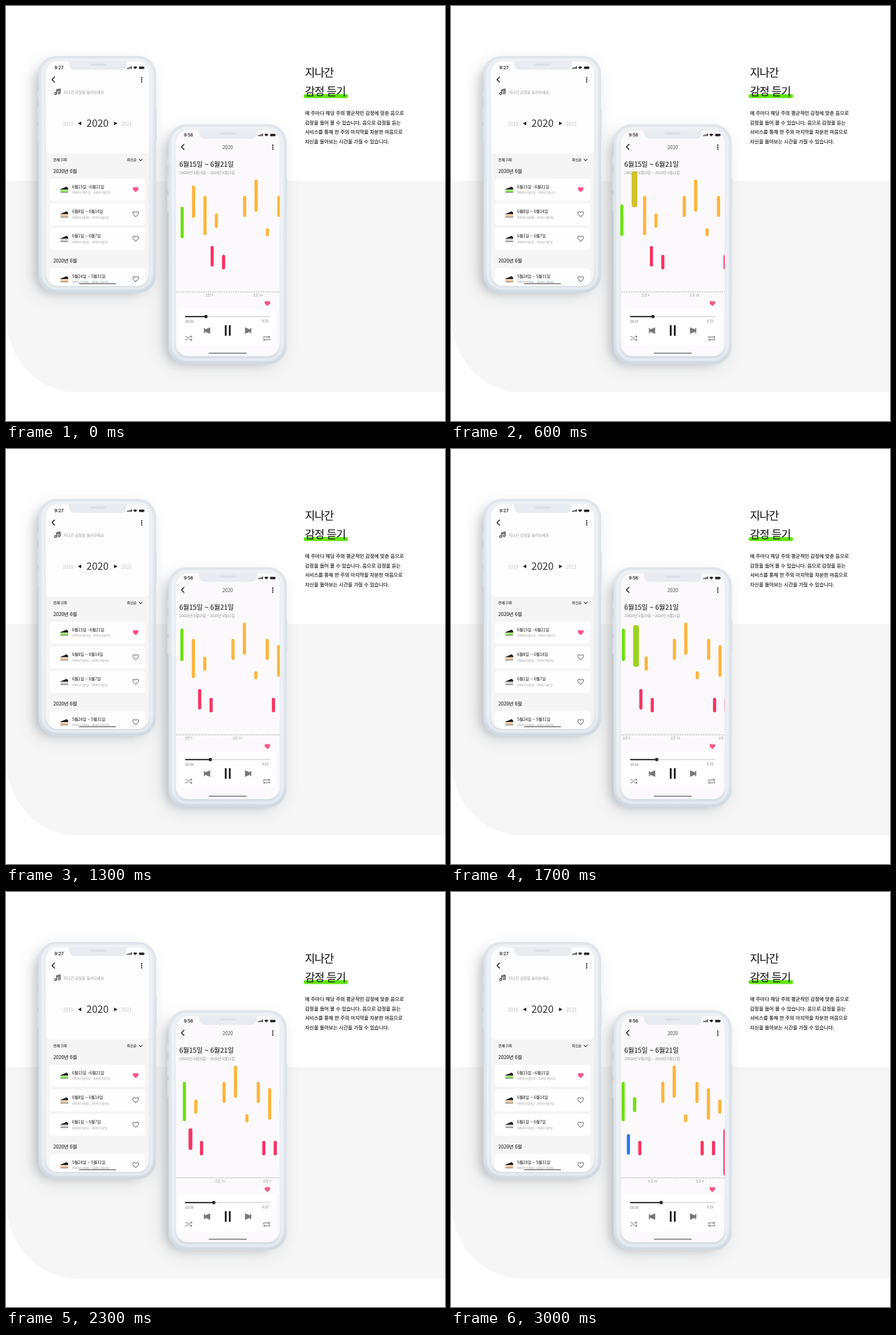
An HTML page that plays this animation: 770x728 px, repeating every 3100 ms.

```html
<!DOCTYPE html>
<html lang="ko">
<head>
<meta charset="utf-8">
<title>지나간 감정 듣기</title>
<style>
html, body { margin: 0; width: 100%; height: 100%; overflow: hidden; background: #fff; }
svg { display: block; width: 770px; height: 728px; font-family: "Noto Sans CJK KR", "Noto Sans CJK", "Noto Sans", sans-serif; }
text { white-space: pre; }
.clock { font: 600 7.4px Inter, sans-serif; }
.line { fill: none; stroke-linecap: round; stroke-linejoin: round; }
</style>
</head>
<body>
<svg viewBox="0 0 770 728">
  <defs>
    <linearGradient id="shell" x1="0" y1="0" x2="0" y2="1">
      <stop offset="0" stop-color="#e9edf1"/><stop offset=".9" stop-color="#e3e9ee"/><stop offset="1" stop-color="#d1d9e0"/>
    </linearGradient>
    <filter id="wide" x="-40%" y="-30%" width="180%" height="160%"><feGaussianBlur stdDeviation="15"/></filter>
    <filter id="near" x="-20%" y="-20%" width="140%" height="140%"><feGaussianBlur stdDeviation="7"/></filter>
    <filter id="rim" x="-10%" y="-10%" width="120%" height="120%"><feGaussianBlur stdDeviation="1.6"/></filter>
    <clipPath id="screenA"><rect x="70" y="97" width="181" height="394" rx="21"/></clipPath>
    <clipPath id="screenB"><rect x="298" y="218" width="182" height="396" rx="21"/></clipPath>
    <clipPath id="chart"><rect x="297" y="275" width="183" height="250"/></clipPath>
    <path id="heart" d="M0 4.6C-3.2 1.8-5 .4-5-1.7C-5-3.3-3.8-4.4-2.5-4.4C-1.4-4.4-.5-3.8 0-3C.5-3.8 1.4-4.4 2.5-4.4C3.8-4.4 5-3.3 5-1.7C5 .4 3.2 1.8 0 4.6Z"/>
    <g id="status">
      <path d="M213 110.2v-1.6M215.3 110.2v-2.4M217.6 110.2v-3.3M219.9 110.2v-4.4" stroke="#222" stroke-width="1.5"/>
      <path d="M223 107.4q3.6-2.9 7.2 0l-3.6 3.4z" fill="#222"/>
      <rect x="233.3" y="106.2" width="9" height="4.2" rx="1" fill="#222"/><path d="M243 107.5v1.6" stroke="#222" stroke-width=".8"/>
      <g fill="#222"><circle cx="238" cy="126" r="1.2"/><circle cx="238" cy="129.5" r="1.2"/><circle cx="238" cy="133" r="1.2"/></g>
    </g>
    <path id="back" class="line" d="M85.2 124.6l-4.5 4.5l4.5 4.5" stroke="#222" stroke-width="1.5"/>
    <path id="skip" d="M347.300 565.200h1.600v2.600l9-3.800v10.800l-9-3.800v2.600h-1.600z" fill="#777" stroke="#777" stroke-width=".5" stroke-linejoin="round"/>
  </defs>

  <rect width="770" height="728" fill="#fff"/>
  <path d="M1 307H770V678H125C57 678 1 620 1 545Z" fill="#f6f6f6"/>

  <g id="phoneA"></g>
  <g clip-path="url(#screenA)">
    <rect x="70" y="97" width="181" height="394" fill="#f5f5f5"/>
    <rect x="70" y="80" width="181" height="179" rx="8" fill="#fefdfe"/>
    <g id="cards"></g>
    <path d="M107 97Q110.500 97 110.500 100Q111 112 121 112H202Q211.500 112 211.500 100Q211.500 97 215 97Z" fill="#e8ecf0"/>
    <rect x="128" y="486" width="65" height="2.2" rx="1.1" fill="#929296"/>
  </g>
  <rect x="147" y="101" width="28" height="3.6" rx="1.8" fill="#dadfe4"/>
  <text class="clock" x="85" y="110.800" fill="#222">9:27</text>
  <use href="#status"/><use href="#back"/>
  <g class="line" stroke="#444" stroke-width="1.3"><path d="M88.800 153.500V146.800L95 145.300V151.800M88.800 149L95 147.500"/><circle cx="87" cy="153.800" r="1.800"/><circle cx="93.200" cy="152.400" r="1.800"/></g>
  <path d="M132 202.800v6.400l-6-3.200zM189.500 202.800v6.400l6-3.200z" fill="#222"/>
  <path class="line" d="M233.300 268.700l2.800 2.800l2.800-2.800" stroke="#333" stroke-width="1.1"/>
  <g id="labelsA"></g>

  <g id="phoneB"></g>
  <g clip-path="url(#screenB)">
    <rect x="298" y="218" width="182" height="396" fill="#fbf9fc"/>
    <path d="M335 218Q338.500 218 338.500 221Q339 233 349 233H430Q439.500 233 439.500 221Q439.500 218 443 218Z" fill="#e8ecf0"/>
  </g>
  <rect x="375" y="222" width="28" height="3.6" rx="1.8" fill="#dadfe4"/>
  <text class="clock" x="312" y="228.800" fill="#222">9:56</text>
  <use href="#status" x="230" y="118"/><use href="#back" x="227" y="118"/>
  <g id="labelsB"></g>
  <g clip-path="url(#chart)">
    <path id="axis" d="M298 501.500H480" stroke="#999" stroke-width=".9" stroke-dasharray="2.400 1.600"/>
    <g id="hours" font-size="5.35" fill="#888"></g>
    <g id="bars"></g>
  </g>
  <use href="#heart" x="458.500" y="521.800" fill="#f65a86"/>
  <rect x="303.500" y="531" width="170.500" height="64" rx="4" fill="#fff"/>
  <path class="line" d="M315 544.800H463" stroke="#dcdcdc" stroke-width="2"/>
  <path class="line" id="played" stroke="#2c2c2c" stroke-width="2.200"/>
  <circle id="knob" cy="544.800" r="3" fill="#2c2c2c"/>
  <text id="clock" x="314.500" y="555.500" font-size="5.8" fill="#777"></text>
  <text x="449" y="554.800" font-size="5.8" fill="#777">0:25</text>
  <use href="#skip"/><use href="#skip" transform="translate(777.300 0) scale(-1 1)"/>
  <path d="M383.800 560h3.200v18.500h-3.200zM390.900 560h3.200v18.500h-3.200z" fill="#222"/>
  <g class="line" stroke="#666" stroke-width="1">
    <path d="M315 580H317.500L322.500 585.500H326M315 585.500H317.500L319 583.900M321 581.700L322.500 580H326M324.400 578.300L326.200 580L324.400 581.700M324.400 583.800L326.200 585.500L324.400 587.200"/>
    <path d="M451.800 582.700V580.500H462.500M460.800 578.800L462.600 580.500L460.800 582.200M462.600 583.300V585.600H452M453.600 583.900L451.800 585.600L453.600 587.300"/>
  </g>
  <rect x="355.500" y="608" width="67" height="2.200" rx="1.100" fill="#929296"/>

  <rect x="522" y="154.500" width="78" height="7" rx="3.500" fill="#62e60c"/>
  <g id="copy"></g>
</svg>
<script>
const NS = 'http://www.w3.org/2000/svg';
const $ = id => document.getElementById(id);

function set(el, attrs) {
  for (const k in attrs) el.setAttribute(k, attrs[k]);
}

function add(parent, tag, attrs, text) {
  const el = document.createElementNS(NS, tag);
  set(el, attrs);
  if (text) el.textContent = text;
  parent.appendChild(el);
  return el;
}

// bold is the width of a thin outline that makes the text heavier
function write(parent, x, y, size, fill, text, bold = 0) {
  return add(parent, 'text', { x, y, 'font-size': size, fill, stroke: fill, 'stroke-width': bold }, text);
}

function phone(parent, x, y, w, h) {
  const box = (dx, dy, bw, bh, rx, more) =>
    add(parent, 'rect', { x: x + dx, y: y + dy, width: bw, height: bh, rx, ...more });
  box(-10, 10, w + 4, h - 4, 36, { fill: '#555c66', opacity: .17, filter: 'url(#wide)' });
  box(-8, 14, w - 8, h - 12, 32, { fill: '#555c66', opacity: .2, filter: 'url(#near)' });
  [[59, 13], [87, 29], [123, 29]].forEach(([dy, bh]) => box(-2, dy, 3, bh, 1, { fill: '#dbe1e7' }));
  box(w - 1, 93, 2.5, 55, 1, { fill: '#dfe4e9' });
  box(0, 0, w, h, 31, { fill: 'url(#shell)' });
  box(2.5, 2.5, w - 5, h - 5, 29, { fill: 'none', stroke: '#c9d3dc', 'stroke-width': 2.5, opacity: .5, filter: 'url(#rim)' });
  box(8, 6.5, w - 16, h - 14, 25, { fill: 'none', stroke: '#f4f6f8', 'stroke-width': 4, opacity: .7, filter: 'url(#rim)' });
  box(.4, .4, w - .8, h - .8, 30.6, { fill: 'none', stroke: '#d5dce2', 'stroke-width': .8 });
}

phone($('phoneA'), 57, 88, 206, 415);
phone($('phoneB'), 285, 208, 207, 420);

const cards = [
  [303, '6월15일 ~6월21일', '6월15일 ~ 2020년 6월21일', '#8dec62'],
  [346.3, '6월8일 ~ 6월14일', '6월8일 ~ 2020년 6월14일', '#f9c89c'],
  [389.3, '6월1일 ~ 6월7일', '6월1일 ~ 2020년 6월7일', '#d2d2d6'],
  [460, '5월24일 ~ 5월31일', '6월8일 ~ 2020년 6월14일', '#f9c89c']
];
cards.forEach(([y, title, span, tint], i) => {
  const g = add($('cards'), 'g', { transform: `translate(0 ${y})` });
  add(g, 'rect', { x: 77, y: 0, width: 167, height: 38.5, rx: 5, fill: '#fefefe' });
  add(g, 'path', { d: 'M95 18.600L106.500 13.800L109 16.500V19H95Z', fill: '#222' });
  add(g, 'rect', { x: 95.5, y: 19.6, width: 13.5, height: 3.8, fill: tint });
  add(g, 'rect', { x: 95.5, y: 23.5, width: 13.5, height: .9, fill: '#444' });
  write(g, 116, 16.5, 7.2, '#333', title, .1);
  write(g, 116, 26.4, 4.3, '#999', '20020년 ' + span);
  const look = i ? { fill: 'none', stroke: '#777', 'stroke-width': 1.1 } : { fill: '#f9568a' };
  add(g, 'use', { href: '#heart', x: 227.5, y: 19, ...look });
});

const a = $('labelsA'), b = $('labelsB'), copy = $('copy');
write(a, 101, 153.5, 6.64, '#999', '지나간 감정을 들어보세요.');
write(a, 99.5, 209.5, 8.6, '#c4c4c4', '2019');
write(a, 141, 212, 17.5, '#333', '2020');
write(a, 201.8, 209.5, 8.6, '#c4c4c4', '2021');
write(a, 83, 272, 6.2, '#333', '전체 (18)', .15);
write(a, 212, 272, 6.2, '#333', '최신순', .15);
write(a, 83, 293, 8.5, '#333', '2020년 6월', .2);
write(a, 83, 450, 8.5, '#333', '2020년 6월', .2);
write(b, 379.7, 250.8, 8.3, '#444', '2020');
write(b, 304, 282.3, 11.75, '#222', '6월15일 ~ 6월21일', .15);
write(b, 304, 294.8, 6.27, '#888', '20020년 6월15일 ~ 2020년 6월21일');

['지나간', '감정 듣기'].forEach((s, i) =>
  write(copy, 524.5, 123.7 + 33.2 * i, 19, '#222', s, .2).setAttribute('letter-spacing', -.8));
['매 주마다 해당 주의 평균적인 감정에 맞춘 음으로',
  '감정을 들어 볼 수 있습니다. 음으로 감정을 듣는',
  '서비스를 통해 한 주의 마지막을 차분한 마음으로',
  '자신을 돌아보는 시간을 가질 수 있습니다.'
].forEach((s, i) => write(copy, 524.5, 190.8 + 16.8 * i, 8.52, '#222', s, .2));

const hours = ['오전 6', '오후 12', '오후 6'].map(s => add($('hours'), 'text', { y: 509 }, s));

// Bars: start centre x, top, bottom, moment of the bounce
const ORANGE = [255, 180, 58], GREEN = [108, 226, 12], RED = [249, 50, 98], BLUE = [42, 122, 238];
const row = (from, to, speed, list) => list.map(([x, top, end, hit = 1e6]) =>
  ({ x, top, end, hit, from, to, speed, el: add($('bars'), 'rect', {}) }));
const bars = [
  ...row(ORANGE, GREEN, 15.7, [
    [309, 348.3, 403.3, -690], [329, 315, 372, 343], [349, 333, 402, 1300], [369, 364, 389, 2393],
    [418.6, 333, 370], [438.6, 304.5, 361], [458.6, 390, 404], [478.6, 333, 370],
    [498.6, 344, 399.5], [518.6, 364, 389]
  ]),
  ...row(RED, BLUE, 16.8, [
    [361.6, 421, 457, 2270], [381.6, 436.5, 462], [490.9, 436.5, 462], [510.9, 436.5, 462], [530.9, 416, 497]
  ])
];

// Piecewise linear curve through [time, value] points
function curve(points, u) {
  if (u <= points[0][0]) return points[0][1];
  for (let i = 1; i < points.length; i++) {
    const [t0, v0] = points[i - 1], [t1, v1] = points[i];
    if (u <= t1) return v0 + (v1 - v0) * (u - t0) / (t1 - t0);
  }
  return points[points.length - 1][1];
}
const LIFT = [[0, 0], [120, 22], [500, 22], [607, 3.5], [680, -4], [730, -3.7], [850, 0]];
const GROW = [[0, 0], [150, 10], [207, 10], [257, 6], [330, 4], [500, 4], [600, 1], [650, 0]];
const WIDE = [[0, 0], [120, 4.5], [450, 4.5], [600, .4], [650, 0]];
const TINT = [[150, 0], [510, 1]];

function draw(ms) {
  const t = ms / 1000;
  for (const s of bars) {
    const u = ms - s.hit;
    const grow = curve(GROW, u), width = 5.5 + curve(WIDE, u), mix = curve(TINT, u);
    set(s.el, {
      x: s.x - 2.75 - s.speed * t,
      y: s.top - curve(LIFT, u) - grow / 2,
      width, height: s.end - s.top + grow, rx: Math.min(width / 2, 4),
      fill: `rgb(${s.from.map((c, i) => Math.round(c + (s.to[i] - c) * mix))})`
    });
  }
  const slide = Math.max(0, 30.5 * (t - .11));
  hours.forEach((el, i) => el.setAttribute('x', 349.2 + 84 * i - slide));
  $('axis').setAttribute('stroke-dashoffset', slide);
  const x = 350.6 + 6 * t;
  $('knob').setAttribute('cx', x);
  $('played').setAttribute('d', `M315 544.8H${x}`);
  $('clock').textContent = '00:0' + Math.floor(6.8 + t);
}

const LOOP = 3100, STEP = 100;
let start;
function tick(now) {
  if (start === undefined) start = now;
  draw(Math.floor((now - start) % LOOP / STEP) * STEP);
  requestAnimationFrame(tick);
}
draw(0);
requestAnimationFrame(tick);
</script>
</body>
</html>
```
